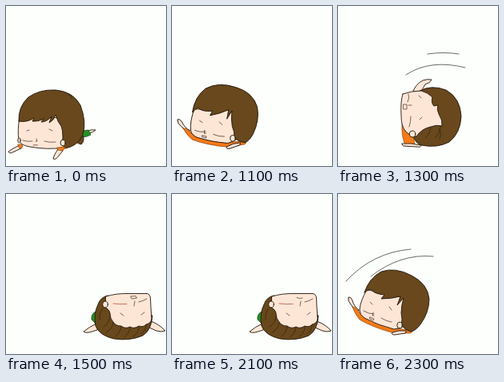
Animation of 200 by 200 pixels, one loop 2400 ms. Source, as an HTML page:

```html
<!DOCTYPE html>
<html lang="en">
<head>
<meta charset="utf-8">
<title>Rolling head</title>
<style>
  html, body { margin: 0; width: 100%; height: 100%; overflow: hidden; background: #fdfffc; }
  svg { display: block; width: 100vw; height: 100vh; }
  path, ellipse { fill: none; stroke: #21170c; stroke-width: .9; stroke-linecap: round; stroke-linejoin: round; }
  .hair { fill: #68481c; }
  .skin { fill: #fee6d6; }
  .orange { fill: #f67a16; stroke: #7a3a0a; stroke-width: .6; }
  .green { fill: #249323; stroke: #123f12; stroke-width: .7; }
  .thin { stroke: #4d3a30; stroke-width: .75; }
  .strand { stroke: #3a260d; stroke-width: .8; }
  .blush { stroke: #c8705e; stroke-width: 1; }
  .swoosh { stroke: #444; stroke-width: .8; }

  /* hard cuts on a 2.4 s loop */
  .cut { visibility: hidden; animation: 2.4s step-end infinite; }
  .rest { animation-name: rest; }
  .rest-a { animation-name: rest-a; }
  .rest-b { animation-name: rest-b; }
  .lift { animation-name: lift; }
  .tilt { animation-name: tilt; }
  .side { animation-name: side; }
  .side-swoosh { animation-name: side-swoosh; }
  .flip { animation-name: flip; }
  .flip-a { animation-name: flip-a; }
  .flip-b { animation-name: flip-b; }
  .tilt-swoosh { animation-name: tilt-swoosh; }

  @keyframes rest { 0% { visibility: visible } 45.8333%, 100% { visibility: hidden } }
  @keyframes rest-a { 0%, 16.6667% { visibility: visible } 8.3333%, 25%, 100% { visibility: hidden } }
  @keyframes rest-b { 0%, 16.6667%, 45.8333%, 100% { visibility: hidden } 8.3333%, 25% { visibility: visible } }
  @keyframes lift { 0%, 50%, 100% { visibility: hidden } 45.8333% { visibility: visible } }
  @keyframes tilt { 0%, 54.1667%, 100% { visibility: hidden } 50%, 95.8333% { visibility: visible } }
  @keyframes side { 0%, 62.5%, 95.8333%, 100% { visibility: hidden } 54.1667%, 91.6667% { visibility: visible } }
  @keyframes side-swoosh { 0%, 62.5%, 100% { visibility: hidden } 54.1667% { visibility: visible } }
  @keyframes flip { 0%, 91.6667%, 100% { visibility: hidden } 62.5% { visibility: visible } }
  @keyframes flip-a { 0%, 70.8333%, 87.5%, 100% { visibility: hidden } 62.5%, 79.1667% { visibility: visible } }
  @keyframes flip-b { 0%, 79.1667%, 91.6667%, 100% { visibility: hidden } 70.8333%, 87.5% { visibility: visible } }
  @keyframes tilt-swoosh { 0%, 100% { visibility: hidden } 95.8333% { visibility: visible } }
</style>
</head>
<body>
<svg viewBox="0 0 200 200">
  <defs>
    <g id="leaning">
      <path class="skin" d="M26 145 Q20 141 18 133 Q16 128 13 129 Q12 134 16 138 L22 146Z"/>
      <path class="orange" d="M18 141 Q23 141 28 150 Q45 162 70 168 L91 170 Q94 173 90 174 L70 174 Q44 167 27 157 Q21 150 18 141Z"/>
      <path class="skin" d="M36 120 Q28 133 27 145 Q27 151 33 155 Q50 164 70 169 L80 167 L84 130Z"/>
      <path class="hair" d="M33 123 Q39 105 54 97 Q72 91 92 102 Q112 112 114 131 Q114 148 103 163 Q97 171 91 172 Q84 170 79 164 Q81 157 79 149 Q79 140 82 130 L74 139 Q76 134 78 128 Q67 131 54 131 L58 126 Q45 125 41 119 Q37 120 33 123Z"/>
      <ellipse class="skin" cx="77" cy="164" rx="3.2" ry="3.8"/>
      <path class="skin" d="M85 171 Q76 170 68 173 Q66 176 71 176 L84 174Z"/>
      <path class="thin" d="M32 146 Q38 150 45 150 M54 155 Q60 159 67 160 M40 135 l3 3 M64 141 l3 4 M44 148 l-1 4 l2 0 M40 154 l5 2 l-1 2 l-4 -2Z"/>
    </g>
  </defs>

  <g class="cut rest">
    <path class="skin" d="M102 156 Q108 154 112 155 Q109 158 104 159Z"/>
    <path class="green" d="M95 156 L103 155 L106 161 Q101 164 95 164Z"/>
    <path class="hair" d="M88 165 L96 162 Q99 168 94 173 Q90 172 88 170Z"/>
    <path class="skin" d="M17 140 Q14 155 16 168 Q18 174 30 176 Q52 180 72 177 L76 140Z"/>
    <path class="hair" d="M16 144 Q15 126 28 114 Q42 104 62 105 Q84 107 93 124 Q101 145 96 161 Q90 175 74 178 Q70 174 71 164 Q71 155 69 150 Q65 146 62 136 Q60 143 54 146 L57 138 Q51 145 44 145 L47 141 Q40 145 33 144 L35 140 Q26 146 16 144Z"/>
    <path class="strand" d="M78 111 q4 0 4 4"/>
    <ellipse class="skin" cx="71" cy="171" rx="3" ry="3.8"/>
    <ellipse class="skin" cx="16.5" cy="168" rx="1.7" ry="3"/>
    <path class="skin" d="M17 174 Q8 178 3 182 Q4 185 8 183 L19 178Z"/>
    <path class="orange" d="M15 173 L20 173 L21 176 L17 178Z"/>
    <path class="skin" d="M65 179 Q60 186 59 191 Q62 193 66 187 L71 181Z"/>
    <path class="orange" d="M64 177 L73 176 L74 178 L70 181 L65 180Z"/>
    <path class="thin" d="M21 168 Q26 170 33 169 M48 169 Q54 171 62 170 M26 156 l3 -1 M54 154 l4 2 M38 166 l1 3 l-2 0"/>
    <path class="cut rest-a thin" d="M34 174 Q37 173 39.5 174"/>
    <path class="cut rest-b thin" d="M34 174.5 L37 173 L39.5 174.5"/>
  </g>

  <use class="cut lift" href="#leaning" transform="translate(-6 3) rotate(-10 70 135)"/>
  <use class="cut tilt" href="#leaning"/>
  <path class="cut tilt-swoosh swoosh" d="M10 109 Q43 73 91 69 M41 103 Q78 74 119 78"/>

  <g class="cut side">
    <path class="skin" d="M94 106 Q98 97 106 93 Q112 91 117 92 Q116 96 109 98 Q106 103 104 107Z"/>
    <path class="orange" d="M80 148 L94 162 L96 173 L84 174 Q79 162 80 148Z"/>
    <path class="hair" d="M102 106 Q117 98 135 105 Q153 115 154 138 Q153 159 139 170 Q124 178 104 174 Q96 171 94 162 L118 130Z"/>
    <path class="skin" d="M81 110 Q92 106 104 106 Q112 108 118 114 Q116 121 120 125 L125 124 Q123 129 126 135 Q131 143 130 150 Q123 148 116 151 Q105 153 98 163 Q90 163 84 156 Q79 150 79 137 Q78 119 81 110Z"/>
    <path class="strand" d="M129 150 q-2 9 -7 15 M116 152 q-1 8 -7 13 M126 153 q4 5 1 13"/>
    <ellipse class="skin" cx="93" cy="160" rx="3.8" ry="4"/>
    <path class="skin" d="M80 172 Q91 171 104 174 Q104 177 98 176 L82 175Z"/>
    <path class="thin" d="M88 110 Q90 115 87 120 M91 138 Q91 145 89 151 M101 112 l3 3 M102 142 l3 -3 M92 124 l-4 0 M82 123 l4 0 l0 6 l-4 0Z"/>
  </g>
  <path class="cut side-swoosh swoosh" d="M112 60 Q132 57 151 60 M85 86 Q115 66 159 77"/>

  <g class="cut flip">
    <path class="skin" d="M113 162 Q104 166 97 172 Q99 174 104 173 L114 170Z"/>
    <path class="skin" d="M181 159 Q192 163 199 171 Q194 173 188 171 L179 167Z"/>
    <path class="green" d="M112 147 Q106 150 107 157 L112 162Z"/>
    <path class="hair" d="M127 127 Q118 129 115 138 Q109 150 112 165 Q117 177 135 181 Q155 184 171 177 Q182 170 183 152 L150 140Z"/>
    <path class="skin" d="M125 128 Q138 124 154 124.5 L176 124.5 Q180 125 180.5 130 Q181 143 182 156 Q181 162 175 163 Q172 167 166 165 Q160 169 155 166 Q149 169 144 165 Q137 165 134 160 Q130 156 130 149 Q129 144 124 142Z"/>
    <path class="strand" d="M130 153 q-1 9 -8 13 M134 161 q-1 8 -9 12 M144 166 q-1 7 -7 12 M155 167 q-1 7 -7 12 M166 166 q0 8 -7 12 M175 164 q0 7 -6 11 M121 143 q-5 6 -4 14"/>
    <ellipse class="skin" cx="124" cy="138" rx="3.3" ry="4"/>
    <path class="blush" d="M134 137 Q142 138 151 137.5"/>
    <path class="thin" d="M166 135 Q171 134 176 131 M143 149 l4 3 M169 151 l4 -3 M161 134 l-1 6"/>
    <path class="cut flip-a thin" d="M156 128 l6 -.5 l1.5 2.5 l-6 1Z"/>
    <path class="cut flip-b thin" d="M156 129.5 l3.5 1 l3.5 -.5"/>
  </g>
</svg>
</body>
</html>
```
